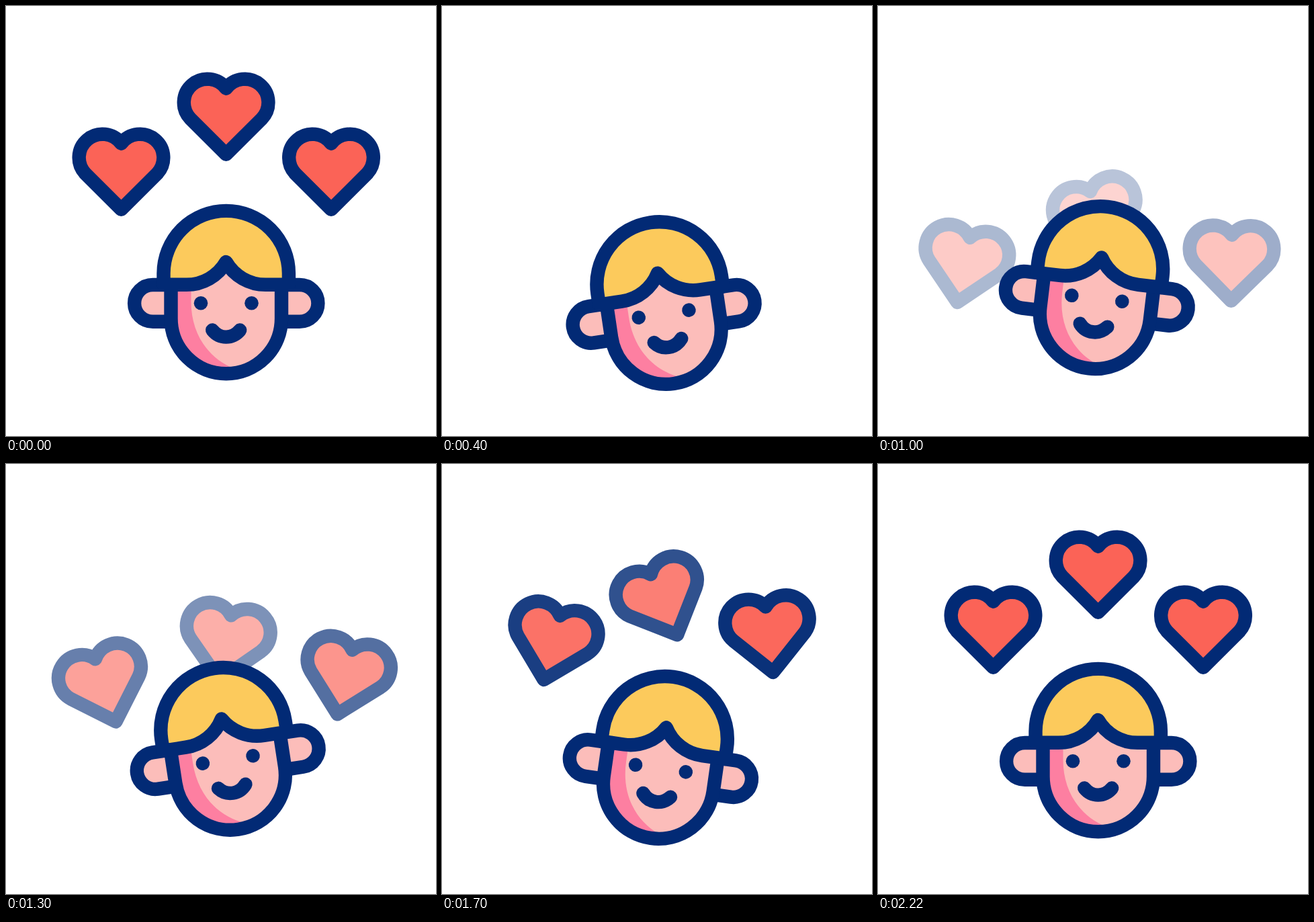
Animation, 640 px wide and 640 px high, one loop 2.4 s. Source, as an HTML page:

```html
<!DOCTYPE html>
<html lang="en">
<head>
<meta charset="utf-8">
<title>Happy face with hearts</title>
<style>
  html, body { margin: 0; width: 100%; height: 100%; overflow: hidden; background: #fff; }
  svg { display: block; width: 100vw; height: 100vh; }
  .line { stroke: #022a75; stroke-width: 20.4; stroke-linecap: round; stroke-linejoin: round; }
  .skin { fill: #fcbdba; }
  .none { fill: none; }
</style>
</head>
<body>
<svg viewBox="0 0 640 640">
  <defs>
    <path id="shape" class="line" fill="#fb6357"
      d="M0 56.3L-53.2 3.2A34.9 34.9 0 1 1 0 -41.8A34.9 34.9 0 1 1 53.2 3.2Z"/>
  </defs>
  <g id="hearts"></g>
  <g id="head">
    <path class="line skin" d="M245.5 415H218.5a27.4 27.4 0 0 0 0 54.8H245.5"/>
    <path class="line skin" d="M410 415H437a27.4 27.4 0 0 1 0 54.8H410"/>
    <path class="skin" d="M245.5 410V465A82.25 82.25 0 0 0 410 465V410L328 380Z"/>
    <path fill="#fd7fa1" d="M245.5 415H275.5V440C275.5 487 300 524 340 540L328 547A82.25 82.25 0 0 1 245.5 465Z"/>
    <path class="line none" d="M245.5 415V465A82.25 82.25 0 0 0 410 465V415"/>
    <path class="line" fill="#fcca5c"
      d="M234.5 414.8V398A93.2 93.2 0 0 1 420.9 398V414.8H386.4A68 68 0 0 1 327.5 381A68 68 0 0 1 268.6 414.8Z"/>
    <g fill="#022a75">
      <circle cx="290" cy="442.3" r="10.3"/>
      <circle cx="365.5" cy="442.3" r="10.3"/>
    </g>
    <path class="line none" d="M307.2 482.5C318 496 337 496 348.2 482.5"/>
  </g>
</svg>
<script>
const LOOP = 2400, BEGIN = 80, END = 2220, RISE = 378, FADE = 140;
const $ = id => document.getElementById(id);
const clamp = s => Math.min(1, Math.max(0, s));
const ease = s => (s = clamp(s), s * s * (3 - 2 * s));

// Eases from one pose to the next on an even beat
function beat(t, step, poses) {
  const u = (t - BEGIN) / step, i = Math.floor(u);
  const a = poses[i] || 0, b = poses[i + 1] || 0;
  return a + (b - a) * ease(u - i);
}

const BOB_STEP = 290, SWAY_STEP = 320;
const bob = [0, 15.7, 27.5, -7, -6, 28, 1];
const tilt = [0, -8.4, -0.4, 7.1, -10.2, 8.2];

// x, y: resting centre; dx, dy: offset at the start of the rise
const hearts = [
  { x: 171.5, y: 246.5, dx: -63, dy: 206, end: 2016, hop: 0, sway: [0, 0, -24.8, 12.6, -21.2, 14.5, -6] },
  { x: 484, y: 246.5, dx: 68, dy: 219, end: 1867, hop: 0, sway: [0, 0, 9.9, 0.3, 14.3, -6.6] },
  { x: 327.6, y: 164.5, dx: 0, dy: 208, end: 2200, hop: 30, sway: [0, 0, 26, -18, 13, -24, 8] }
];

for (const h of hearts) {
  h.el = document.createElementNS("http://www.w3.org/2000/svg", "use");
  h.el.setAttribute("href", "#shape");
  $("hearts").append(h.el);
}

function place(el, x, y, angle, alpha) {
  el.setAttribute("transform", `translate(${x} ${y}) rotate(${angle})`);
  el.setAttribute("opacity", alpha);
}

function drawHeart(h, t) {
  if (t < RISE) return place(h.el, h.x, h.y, 0, 1 - ease((t - BEGIN) / FADE));
  const p = ease((t - RISE) / (h.end - RISE)), left = 1 - p;
  const hop = h.hop * Math.sin(Math.PI * clamp((t - 1700) / (END - 1700)));
  place(h.el, h.x + h.dx * left, h.y + h.dy * left - hop, beat(t, SWAY_STEP, h.sway), p);
}

function draw(t) {
  if (t >= END) t = BEGIN;
  t = Math.max(t, BEGIN);
  const y = beat(t, BOB_STEP, bob), angle = beat(t, SWAY_STEP, tilt);
  $("head").setAttribute("transform", `translate(0 ${y}) rotate(${angle} 327.7 426)`);
  hearts.forEach(h => drawHeart(h, t));
}

const start = performance.now();
function tick() {
  draw((performance.now() - start) % LOOP);
  requestAnimationFrame(tick);
}
tick();
</script>
</body>
</html>
```
